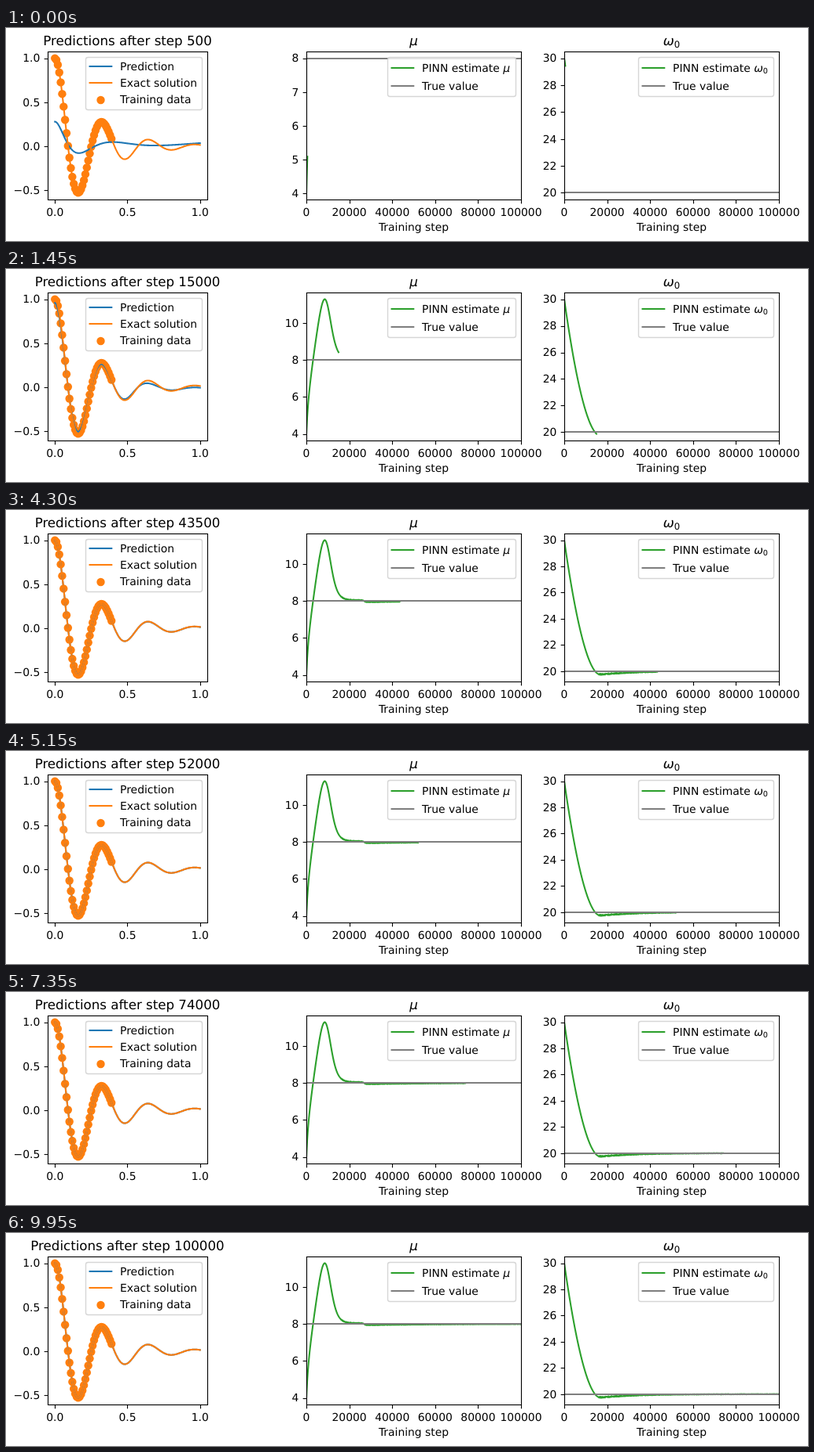
Write an HTML page that moves like this. It is 1020 px wide and 272 px high and loops after 10 s.

```html
<!DOCTYPE html>
<html lang="en">
<head>
<meta charset="utf-8">
<title>Training progress</title>
<style>
  html, body { margin: 0; width: 100%; height: 100%; overflow: hidden; background: #fff; }
  svg { display: block; width: 1020px; height: 272px; }
  text { font: 13.889px "DejaVu Sans", sans-serif; text-rendering: geometricPrecision; white-space: pre; }
  .title { font-size: 16.667px; }
  .it { font-style: italic; }
  .sub { font-size: 70%; }
</style>
</head>
<body>
<svg id="stage" viewBox="0 0 1020 272" xmlns="http://www.w3.org/2000/svg"></svg>
<script>
const STEP_MS = 50, FRAMES = 200, STEPS = 500, SAMPLE = 100, TOTAL = FRAMES * STEPS;
const TOP = 30, BOTTOM = 219, MARGIN = 0.05;
const BLUE = "#1f77b4", ORANGE = "#ff7f0e", GREEN = "#2ca02c", GRAY = "#7f7f7f";
const stage = document.getElementById("stage");

function add(parent, tag, attrs, html) {
  const el = document.createElementNS("http://www.w3.org/2000/svg", tag);
  for (const k in attrs) el.setAttribute(k, attrs[k]);
  if (html !== undefined) el.innerHTML = html;
  parent.appendChild(el);
  return el;
}

const label = (parent, x, y, html, anchor = "start", cls = "") =>
  add(parent, "text", { x, y, "text-anchor": anchor, class: cls }, html);

const curve = (parent, color) =>
  add(parent, "path", { fill: "none", stroke: color, "stroke-width": 2.08, "stroke-linejoin": "round", "stroke-linecap": "square" });

const rule = (parent, x1, x2, y, color) =>
  add(parent, "path", { d: `M${x1} ${y}H${x2}`, stroke: color, "stroke-width": 2.08 });

const tickMark = (parent, d) => add(parent, "path", { d, stroke: "#000", "stroke-width": 1.11 });

const toPath = pts => "M" + pts.map(p => p[0].toFixed(2) + " " + p[1].toFixed(2)).join("L");
const snap = v => Math.round(v) + 0.5;

// Axes frame with x ticks; y ticks are drawn by setTicks
function makeAxes(left, right, max, step, digits, xPos) {
  const id = "clip" + left, box = { x: left + 0.5, y: TOP + 0.5, width: right - left, height: BOTTOM - TOP };
  add(add(stage, "clipPath", { id }), "rect", box);
  const data = add(stage, "g", { "clip-path": `url(#${id})` });
  const frame = add(stage, "g", {});
  add(frame, "rect", { ...box, fill: "none", stroke: "#000", "stroke-width": 1.11 });
  for (let v = 0; v <= max; v += step) {
    tickMark(frame, `M${snap(xPos(v))} ${BOTTOM + 0.5}v4.86`);
    label(frame, xPos(v), 240, v.toFixed(digits), "middle");
  }
  return { left, data, ticks: add(stage, "g", {}) };
}

function yScale(min, max) {
  const pad = (max - min) * MARGIN, lo = min - pad, hi = max + pad;
  const y = v => BOTTOM - (v - lo) / (hi - lo) * (BOTTOM - TOP);
  return { lo, hi, y };
}

function setTicks(axes, scale, step, digits) {
  axes.ticks.textContent = "";
  for (let v = Math.ceil(scale.lo / step) * step; v <= scale.hi; v += step) {
    const y = scale.y(v);
    tickMark(axes.ticks, `M${axes.left + 0.5} ${snap(y)}h-4.86`);
    label(axes.ticks, axes.left - 9.7, Math.round(y + 4.9), v.toFixed(digits).replace("-", "\u2212"), "end");
  }
}

function legend(x, right, bottom, rows) {
  add(stage, "rect", { x, y: 37.5, width: right - x, height: bottom - 37.5, rx: 2.8,
    fill: "#fff", "fill-opacity": 0.8, stroke: "#ccc", "stroke-opacity": 0.8, "stroke-width": 1.39 });
  for (const [base, html, color, dot] of rows) {
    if (dot) add(stage, "circle", { cx: x + 19, cy: base - 4, r: 5.2, fill: color });
    else rule(stage, x + 4, x + 33.8, base - 5, color);
    label(stage, x + 43.6, base, html);
  }
}

// Damped oscillation that starts at 1 with no slope
const ring = (phase, decay) => Math.exp(-decay * phase) * (Math.cos(phase) + decay * Math.sin(phase));
const sigmoid = x => 1 / (1 + Math.exp(-x));

const DAMP = 4, FREQ = Math.sqrt(400 - DAMP * DAMP);
const exact = t => ring(FREQ * t, DAMP / FREQ);

// Untrained network: weak oscillation with a growing period
const firstGuess = t => 0.264 * ring(Math.PI * Math.log(1 + 2.42 * t) / Math.log(1.4), 1 / 3) + 0.016 + 0.02 * t ** 4;

function predict(t, step) {
  const u = exact(t);
  const miss = -u * (0.04 + 0.4 * sigmoid((t - .58) / .04)) - 0.015 * sigmoid((t - .75) / .05);
  const settle = Math.min(1, Math.exp((15000 - step) / 10000));
  const early = Math.exp((500 - step) / (2500 + 2500 * t));
  return u + miss * settle + (firstGuess(t) - u - miss) * early;
}

// Climbs past the true value, falls back, then creeps towards it
function muTrend(s) {
  const late = sigmoid((s - 27000) / 400);
  const level = 8 + 0.045 * (1 - late) - 0.065 * late * Math.exp((27000 - s) / 35000);
  const climb = 5.4 + 0.84 * s / 1000 - 1.4 * Math.exp(-s / 800);
  return level + (climb - level) * sigmoid((9970 - s) / 1550);
}

// Drops slightly below the true value and recovers
const omegaTrend = s => 20 - 0.24 * Math.min(1, Math.exp((18000 - s) / 17000))
  + 10.24 * Math.max(0, 1 - s / 16500) ** 1.85;

function noise(i) {
  const v = Math.sin(i * 12.9898 + 78.233) * 43758.5453;
  return 2 * (v - Math.floor(v)) - 1;
}

// Trend sampled over training, with jitter that fades after settling
const series = (trend, amp) => Array.from({ length: TOTAL / SAMPLE + 1 }, (_, i) => {
  const s = i * SAMPLE, jitter = s < 16000 ? 0 : 0.25 + 0.75 * Math.exp((16000 - s) / 15000);
  return trend(s) + amp * jitter * noise(i);
});

// Left panel
const tx = t => 62.2 + t * 184.55;
const fit = makeAxes(53, 256, 1, 0.5, 1, tx);
const fitScale = yScale(exact(Math.PI / FREQ), 1);
const plot = f => toPath(Array.from({ length: 301 }, (_, i) => [tx(i / 300), fitScale.y(f(i / 300))]));
setTicks(fit, fitScale, 0.5, 1);
for (let t = 0; t < 0.395; t += 0.01)
  add(fit.data, "circle", { cx: tx(t), cy: fitScale.y(exact(t)), r: 5.2, fill: ORANGE });
const guess = curve(fit.data, BLUE);
curve(fit.data, ORANGE).setAttribute("d", plot(exact));
const heading = label(stage, 154.5, 22, "", "middle", "title");
legend(101.5, 249.5, 104.5, [
  [54, "Prediction", BLUE], [75, "Exact solution", ORANGE], [96, "Training data", ORANGE, true]
]);

// Parameter panels
function paramPanel(left, right, legendX, symbol, truth, values) {
  const sx = s => left + s / TOTAL * (right - left);
  const axes = makeAxes(left, right, TOTAL, 20000, 0, sx);
  const line = curve(axes.data, GREEN), mark = rule(axes.data, left, right, 0, GRAY);
  const mid = (left + right) / 2;
  label(stage, mid, 22, symbol, "middle", "title");
  label(stage, mid, 259, "Training step", "middle");
  legend(legendX, right - 6.5, 87.5, [
    [56, "PINN estimate " + symbol, GREEN], [79, "True value", GRAY]
  ]);
  return step => {
    const seen = values.slice(0, step / SAMPLE + 1);
    const scale = yScale(Math.min(truth, ...seen), Math.max(truth, ...seen));
    setTicks(axes, scale, scale.hi - scale.lo > 6 ? 2 : 1, 0);
    line.setAttribute("d", toPath(seen.map((v, i) => [sx(i * SAMPLE), scale.y(v)])));
    mark.setAttribute("d", `M${left} ${Math.round(scale.y(truth))}H${right + 1}`);
  };
}

const MU = '<tspan class="it">μ</tspan>';
const OMEGA = '<tspan class="it">ω</tspan><tspan class="sub" dy="0.23em">0</tspan>';
const panels = [
  paramPanel(382, 655, 485.5, MU, 8, series(muTrend, 0.02)),
  paramPanel(710, 983, 804.5, OMEGA, 20, series(omegaTrend, 0.05))
];

let shown = -1;
function draw(ms) {
  const i = Math.floor(ms / STEP_MS) % FRAMES;
  if (i === shown) return;
  shown = i;
  const step = (i + 1) * STEPS;
  heading.textContent = "Predictions after step " + step;
  guess.setAttribute("d", plot(t => predict(t, step)));
  for (const update of panels) update(step);
}

const start = performance.now();
function tick() {
  draw(performance.now() - start);
  requestAnimationFrame(tick);
}
tick();
</script>
</body>
</html>
```
